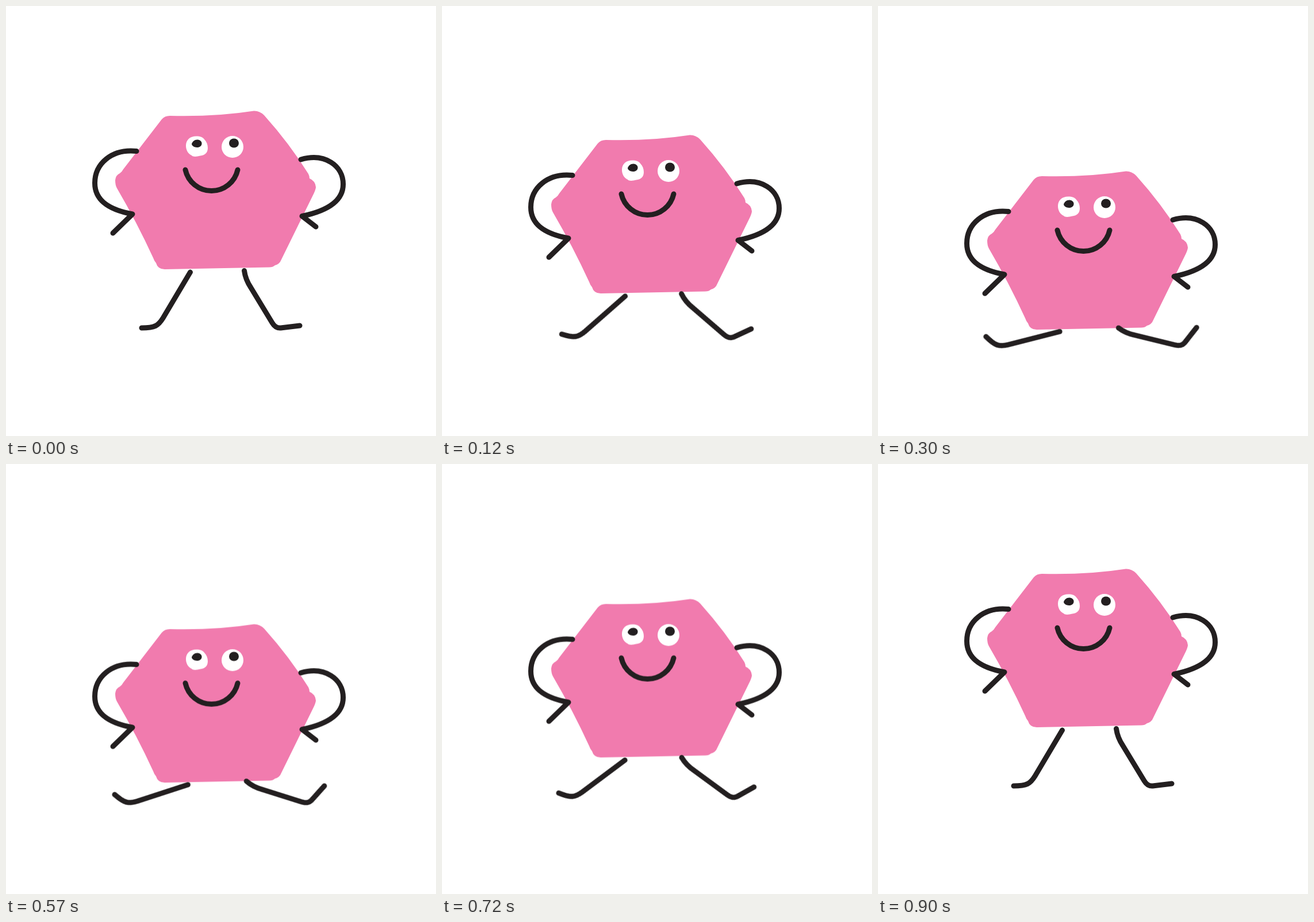
An HTML page without scripts for the animation above (1.56 s loop, 748x748 px).

```html
<!DOCTYPE html>
<html lang="en">
<head>
<meta charset="utf-8">
<title>Squatting hexagon</title>
<style>
  html, body { margin: 0; width: 100%; height: 100%; overflow: hidden; background: #fff; }
  svg { display: block; width: 100%; height: 100%; }

  .line { fill: none; stroke: #231f20; stroke-width: 9; stroke-linecap: round; stroke-linejoin: round; }
  .skin { fill: #f17bae; }
  .eye { fill: #fff; }
  .pupil { fill: #231f20; }

  .figure, .leg { animation: 1560ms infinite; }
  .figure { animation-name: squat; }
  .leg { animation-name: bend; }
  .left { --bend: 45deg; transform-origin: 320.4px 457px; }
  .right { --bend: -45deg; transform-origin: 409.8px 453px; }

  /* down 0-300 ms, hold, up 540-900 ms, rest */
  @keyframes squat {
    0% { transform: translateY(0); animation-timing-function: steps(10); }
    19.23% { transform: translateY(105px); }
    34.615% { transform: translateY(105px); animation-timing-function: steps(12); }
    57.69%, 100% { transform: translateY(0); }
  }
  @keyframes bend {
    0% { transform: rotate(0deg); animation-timing-function: steps(10); }
    19.23% { transform: rotate(var(--bend)); }
    34.615% { transform: rotate(var(--bend)); animation-timing-function: steps(12); }
    57.69%, 100% { transform: rotate(0deg); }
  }
</style>
</head>
<body>
<svg viewBox="0 0 748 748">
  <g class="figure">
    <path class="skin" d="M271 197 Q276 191 285 191 Q364 193 431 182.5 Q441 182 449 190
      Q493 239 526 292 Q528 296 528 300 Q538 304 539 315 Q539 318 536 325
      L479 441 Q476 449 468 451 Q464 454.5 458 454.5 L276 458 Q264 458 261 447
      Q258 444 256 438 Q228 377 193 317 Q190 312 190 303 Q191 294 198 291 Q202 288 204 284 Z"/>

    <path class="eye" d="M313 243 C313 233 320 226.500 331 226.500 C338 226.500 342 228 345 232
      C349 236 351 241 351 247 C351 255 346 260 338 260.500 C332 262 326 263 323 260 C317 257 313 251 313 243 Z"/>
    <path class="pupil" d="M323 240 C324 236 328 232.500 333 232.500 C338 233 341 236 340.500 240
      C340 244 336 246 332 246 C328 246 323 243 323 240 Z"/>
    <circle class="eye" cx="394" cy="245" r="19"/>
    <ellipse class="pupil" cx="396.500" cy="238.500" rx="8.500" ry="8"/>

    <g class="line">
      <path d="M312 285 A46.600 46.600 0 0 0 403 285"/>
      <path d="M227 252.500 C183 248 154.500 275 154.500 308 C154.500 340 182 355 220 362 L186 395"/>
      <path d="M513 267 C555 255 586.500 278 586.500 310 C586.500 340 556 357 515 365.500 L539 384"/>
      <path class="leg left" d="M320.500 463 L273 543 C265 556 259 560 236 560"/>
      <path class="leg right" d="M414.500 460.500 C416 472 420 481 426 490 L463 551 Q469 561 478 560 L511 556"/>
    </g>
  </g>
</svg>
</body>
</html>
```
